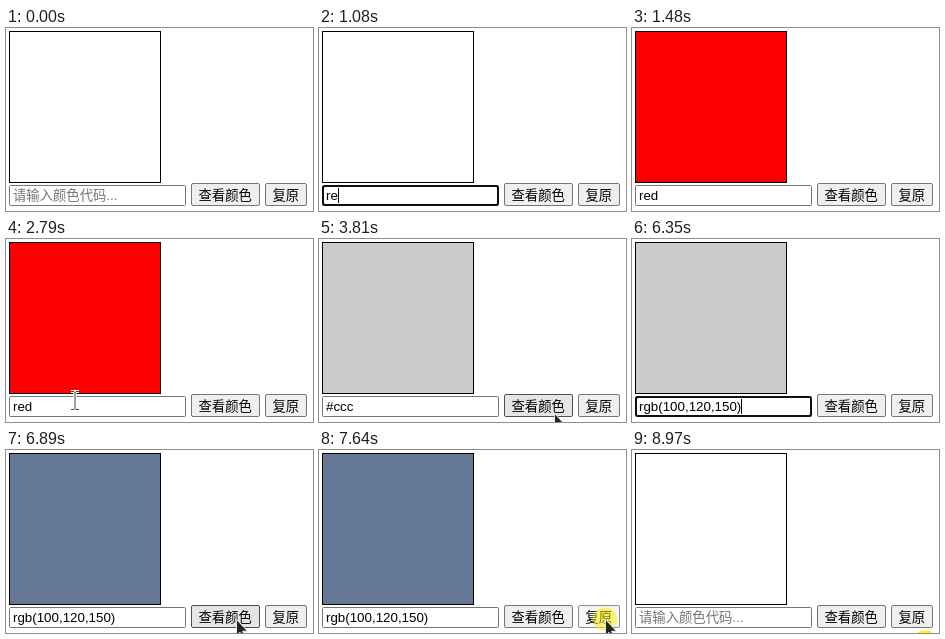
Recreate the animation shown at these times as an HTML page. Size 307 by 183 pixels, loop 9060 ms.

```html
<!DOCTYPE html>
<html lang="zh">
<head>
<meta charset="utf-8">
<style>
html, body { margin: 0; width: 100%; height: 100%; overflow: hidden; background: #fff; }
svg { display: block; font: 13.333px "Liberation Sans", "Noto Sans CJK SC", "Noto Sans CJK", sans-serif; }
text { white-space: pre; }
.btn rect { fill: #efefef; stroke: #767676; }
.btn.hover rect { fill: #e5e5e5; stroke: #4f4f4f; }
.btn.down rect { fill: #f5f5f5; stroke: #8d8d8d; }
</style>
</head>
<body>
<svg width="307" height="183" viewBox="0 0 307 183">
  <rect id="swatch" x="3.5" y="3.5" width="151" height="151" stroke="#000"/>
  <rect x="3.5" y="157.5" width="176" height="20" rx="1" fill="#fff" stroke="#767676"/>
  <rect id="ring" x="4" y="158" width="175" height="19" rx="2" fill="none" stroke="#101010" stroke-width="2"/>
  <rect id="mark" x="7" y="160" height="15" fill="#0078d7"/>
  <text id="value" x="7" y="172"></text>
  <rect id="caret" y="160" width="1" height="15"/>
  <g id="view" class="btn"><rect x="185.5" y="155.5" width="68" height="22" rx="1.5"/><text x="192.5" y="172">查看颜色</text></g>
  <g id="reset" class="btn"><rect x="259.5" y="155.5" width="41" height="22" rx="1.5"/><text x="266.5" y="172">复原</text></g>
  <circle id="glow" r="12" fill="#fff000"/>
  <path id="arrow" d="M.5 .5V16.5L4 13.2L6.5 18.5L9 17.5L6.6 12.2H11.5Z" fill="#222" stroke="#fff" stroke-width=".8"/>
  <g id="beam" fill="none">
    <path id="bar" d="M-4 -8.5H-1L0 -7.5L1 -8.5H4M0 -7.5V8.5M-4 9.5H-1L0 8.5L1 9.5H4" stroke="#fff" stroke-width="3"/>
    <use href="#bar" style="stroke: #444"/>
    <path d="M-4 -8.5H-1L0 -7.5L1 -8.5H4M0 -7.5V8.5M-4 9.5H-1L0 8.5L1 9.5H4" stroke="#444"/>
  </g>
</svg>
<script>
const LOOP = 9060, TICK = 78, CLICK = 80, RESET = 7640;
const $ = id => document.getElementById(id);

// Each round: focus the field, type a colour, press the view button.
const rounds = [
  { text: "red", focus: 680, type: 930, done: 1090, press: 1330 },
  { text: "#ccc", focus: 2870, type: 3030, done: 3260, press: 3730 },
  { text: "rgb(100,120,150)", focus: 5460, type: 5620, done: 6350, press: 6810 }
];
const clicks = [...rounds.flatMap(r => [r.focus, r.press]), RESET, 8970];

// The pointer glides between two points, rests, and is hidden at `hide`.
const glides = [
  { start: 530, end: 600, from: [84, 180], to: [80, 171], hide: 930 },
  { start: 1170, end: 1330, from: [150, 168], to: [232, 171], hide: 1480 },
  { start: 2410, end: 2790, from: [38, 121], to: [69, 161], hide: 3030 },
  { start: 3340, end: 3580, from: [150, 172], to: [235, 174] },
  { start: 4050, end: 4280, from: [224, 174], to: [170, 179], hide: 4350 },
  { start: 5290, end: 5460, from: [110, 180], to: [80, 162], hide: 5620 },
  { start: 6430, end: 6740, from: [150, 172], to: [230, 169] },
  { start: 7040, end: 7430, from: [238, 172], to: [286, 169] },
  { start: 7970, end: 8040, from: [291, 178], to: [293, 192] }
];

const last = (list, test) => list.findLast(test);
const inside = (x, y, l, t, r, b) => x >= l && x < r && y >= t && y < b;
const show = (id, on) => $(id).setAttribute("visibility", on ? "visible" : "hidden");

function pointerAt(t) {
  const g = last(glides, g => g.start <= t);
  if (!g || t >= g.hide) return [];
  const time = g.end - g.start, steps = Math.round(time / TICK);
  const p = Math.min(1, Math.floor((t - g.start) / time * steps) / steps);
  return g.from.map((v, i) => v + (g.to[i] - v) * p);
}

function textAt(t) {
  const r = last(rounds, r => r.type <= t);
  if (!r || t >= RESET + CLICK) return "";
  const p = (t - r.type) / (r.done - r.type);
  return r.text.slice(0, 1 + Math.floor(p * (r.text.length - 1)));
}

function draw(t) {
  const [x, y] = pointerAt(t), text = textAt(t);
  const pressed = clicks.some(c => t >= c && t < c + CLICK);
  const round = rounds.find(r => t >= r.focus && t < r.press);
  const marked = round && text && t >= round.focus + CLICK && t < round.type;
  const viewed = last(rounds, r => r.press + CLICK <= t);

  $("swatch").setAttribute("fill", viewed && t < RESET + CLICK ? viewed.text : "#fff");
  const value = $("value"), shown = text || "请输入颜色代码...";
  if (value.textContent !== shown) value.textContent = shown;
  value.setAttribute("fill", marked ? "#fff" : text ? "#000" : "#757575");
  const width = text ? value.getComputedTextLength() : 0;
  $("mark").setAttribute("width", width);
  $("caret").setAttribute("x", Math.round(7 + width));
  show("mark", marked);
  show("ring", round);
  show("caret", round && !marked);

  for (const [id, left, right] of [["view", 185, 254], ["reset", 259, 301]]) {
    const over = inside(x, y, left, 155, right, 178);
    $(id).setAttribute("class", "btn" + (over ? pressed ? " down" : " hover" : ""));
  }

  const visible = x !== undefined, overField = inside(x, y, 3, 157, 180, 178);
  show("arrow", visible && !overField);
  show("beam", visible && overField);
  show("glow", pressed);
  $("glow").setAttribute("opacity", y > 183 ? .85 : .5);
  if (visible) for (const id of ["arrow", "beam", "glow"])
    $(id).setAttribute("transform", `translate(${x} ${y})`);
}

const start = performance.now();
function tick() {
  draw((performance.now() - start) % LOOP);
  requestAnimationFrame(tick);
}
tick();
</script>
</body>
</html>
```
